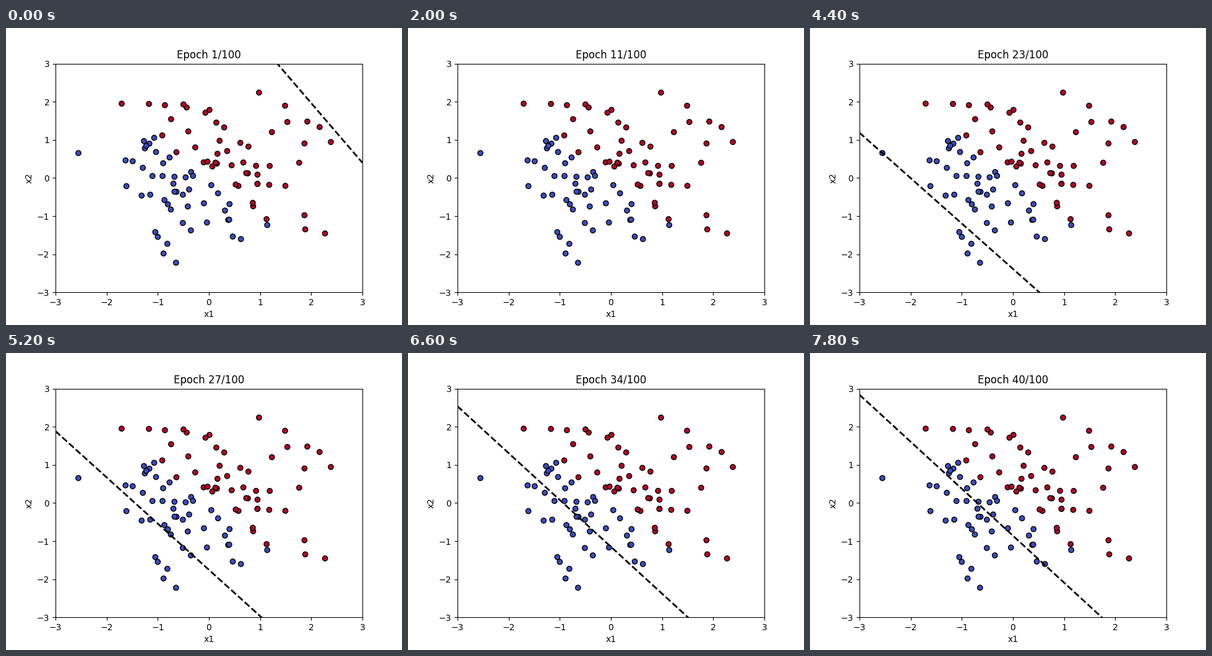
A matplotlib script that plays this animation: 640x480 px, repeating every 8 s.

```python
import numpy as np
import matplotlib.pyplot as plt
from matplotlib.animation import FuncAnimation

SHOWN = 40
EPOCHS = 100
RATE = 0.1
LIMIT = 3

rng = np.random.RandomState(0)
X = rng.randn(100, 2)
y = (X.sum(axis=1) > 0).astype(int)


def train(w, b, steps):
    """Logistic regression by gradient descent; returns (w1, w2, b) per epoch."""
    history = []
    for _ in range(steps):
        error = 1 / (1 + np.exp(-(X @ w + b))) - y
        w = w - RATE * X.T @ error / len(y)
        b = b - RATE * error.mean()
        history.append((w[0], w[1], b))
    return history


start_w = rng.randn(2)
start_b = rng.randn()
history = train(start_w, start_b, SHOWN)

fig, ax = plt.subplots(figsize=(6.4, 4.8), dpi=100)
ax.scatter(X[:, 0], X[:, 1], c=y, cmap="coolwarm", edgecolors="k")
ax.set_xlim(-LIMIT, LIMIT)
ax.set_ylim(-LIMIT, LIMIT)
ax.set_xlabel("x1")
ax.set_ylabel("x2")
title = ax.set_title("")
xs = np.array([-LIMIT, LIMIT])
boundary, = ax.plot([], [], "k--", lw=2)


def update(i):
    w1, w2, b = history[i]
    boundary.set_data(xs, -(w1 * xs + b) / w2)
    title.set_text(f"Epoch {i + 1}/{EPOCHS}")
    return boundary, title


anim = FuncAnimation(fig, update, frames=SHOWN, interval=200, repeat=True,
                     repeat_delay=0, blit=False)
plt.show()
```
